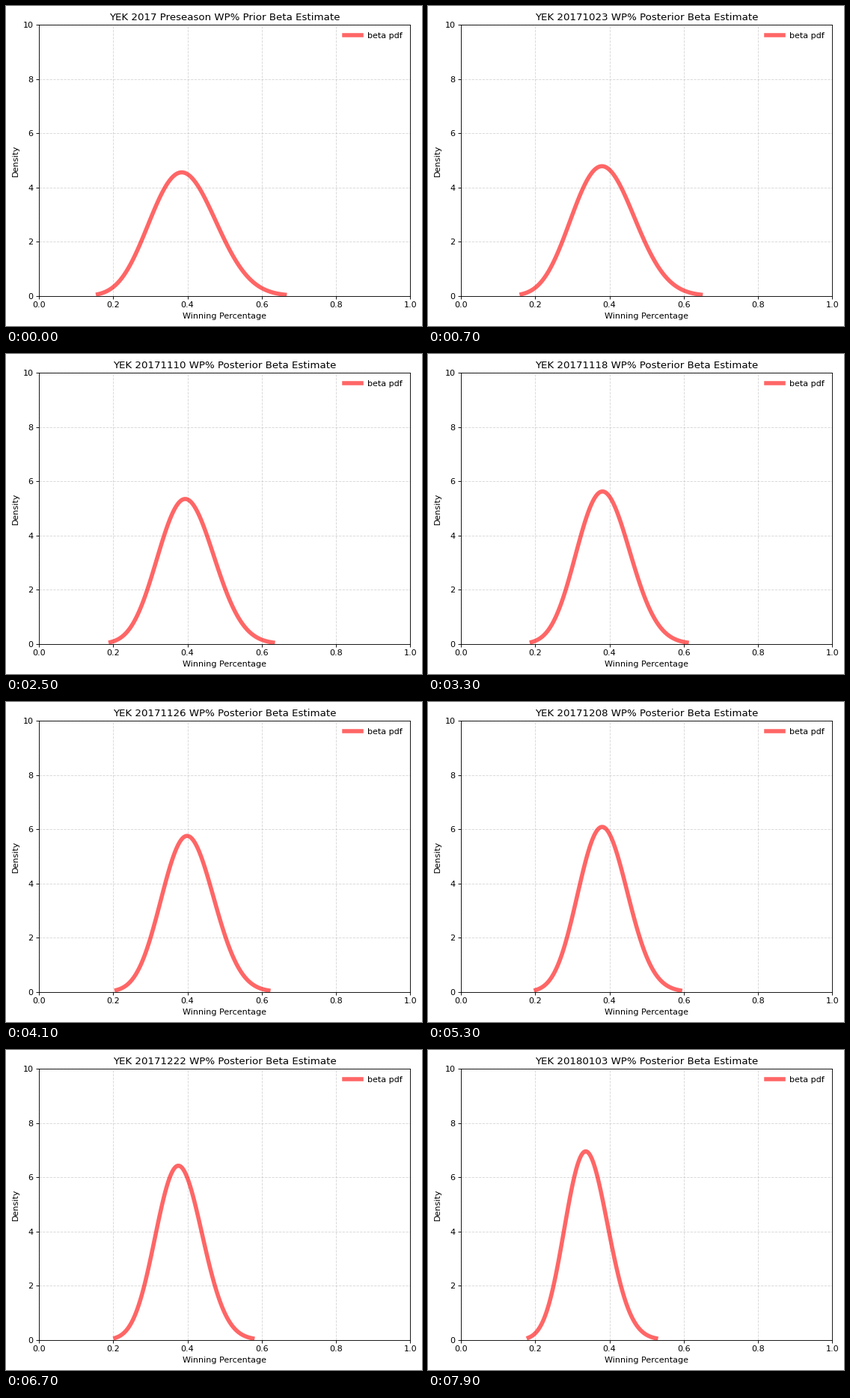
Recreate the animation shown at these times as a matplotlib script. Size 556 by 428 pixels, loop 8 s.

```python
import numpy as np
import matplotlib.pyplot as plt
from matplotlib.animation import FuncAnimation

DPI, W, H = 80, 556, 428
LEFT, BOTTOM, AX_W, AX_H = 44.2, 40.4, 496, 362.4
FRAMES, INTERVAL = 80, 100
TEAM = "YEK"
PRIOR_WINS, PRIOR_LOSSES = 12.3, 19.1
OPENING = np.datetime64("2017-10-17")

# Days since opening night on which a game was won or lost
WINS = np.array([3, 8, 14, 17, 19, 27, 33, 35, 51, 53, 64])
LOSSES = np.array([2, 5, 10, 11, 16, 22, 23, 25, 29, 31, 36, 41, 43,
                   46, 47, 56, 58, 62, 66, 67, 69, 71, 73, 75, 76, 78])

GRID = np.linspace(0, 1, 8001)[1:-1]


def beta_curve(a, b, tail=0.001, n=100):
    """Beta density between its lower and upper tail quantiles."""
    log_pdf = (a - 1) * np.log(GRID) + (b - 1) * np.log1p(-GRID)
    pdf = np.exp(log_pdf - log_pdf.max())
    step = GRID[1] - GRID[0]
    pdf /= pdf.sum() * step
    cdf = np.cumsum(pdf) * step - pdf * step / 2
    lo, hi = np.interp([tail, 1 - tail], cdf, GRID)
    x = np.linspace(lo, hi, n)
    return x, np.interp(x, GRID, pdf)


def heading(day):
    if day < 0:
        return f"{TEAM} 2017 Preseason WP% Prior Beta Estimate"
    stamp = str(OPENING + day).replace("-", "")
    return f"{TEAM} {stamp} WP% Posterior Beta Estimate"


plt.rcParams["font.family"] = "DejaVu Sans"
fig = plt.figure(figsize=(W / DPI, H / DPI), dpi=DPI, facecolor="white")
ax = fig.add_axes([LEFT / W, BOTTOM / H, AX_W / W, AX_H / H])
ax.set(xlim=(0, 1), ylim=(0, 10),
       xlabel="Winning Percentage", ylabel="Density")
ax.grid(linestyle="--", color="#b0b0b0", alpha=0.5)
ax.set_axisbelow(True)
line, = ax.plot([], [], "r-", lw=5, alpha=0.6, label="beta pdf")
ax.legend(loc="upper right", frameon=False)
title = ax.set_title(heading(-1))


def update(i):
    day = i - 1
    wins = np.count_nonzero(WINS <= day)
    losses = np.count_nonzero(LOSSES <= day)
    line.set_data(*beta_curve(PRIOR_WINS + wins, PRIOR_LOSSES + losses))
    title.set_text(heading(day))
    return line, title


anim = FuncAnimation(fig, update, frames=FRAMES, interval=INTERVAL,
                     repeat=True, repeat_delay=0, blit=False)
plt.show()
```
